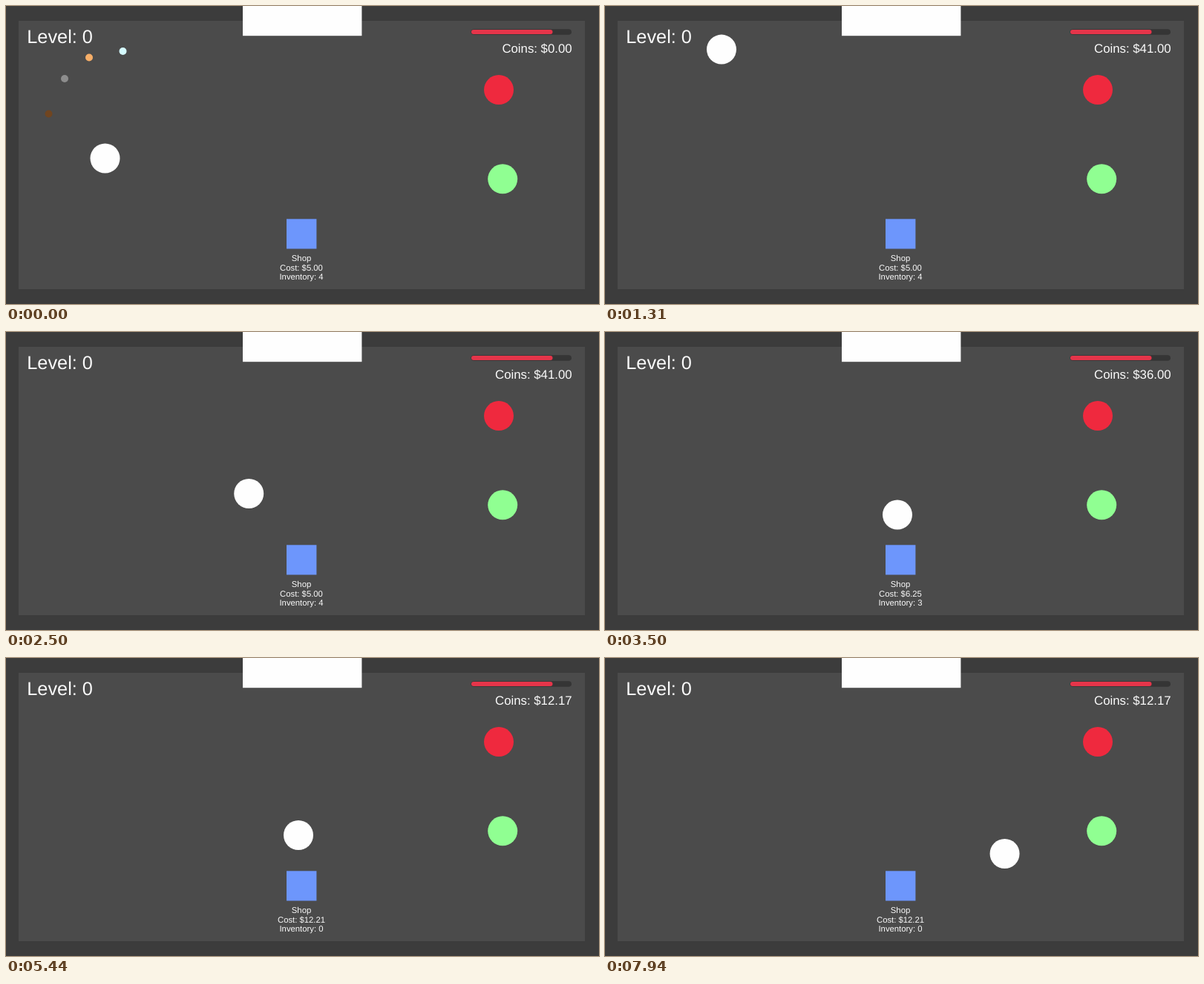
An HTML page with a canvas that plays this animation: 799 px wide and 402 px high, repeating every 8000 ms.

```html
<!DOCTYPE html>
<html lang="en">
<head>
<meta charset="utf-8">
<title>Coin shop</title>
<style>
  html, body { margin: 0; width: 100%; height: 100%; overflow: hidden; background: #3c3c3c; }
  canvas { display: block; }
</style>
</head>
<body>
<canvas id="stage" width="799" height="402"></canvas>
<script>
const ctx = document.getElementById('stage').getContext('2d');
ctx.textRendering = 'geometricPrecision';

const LOOP = 8000;
const STEP = 62.5;      // 16 pictures per second
const SPEED = 0.205;    // player speed, px per ms
const REACH = 25;       // player radius + coin radius
const WHITE = '#fefefe';
const DOOR = { x: 394, y: 267 };
const LEAVE = 6902;

// Corners of the walks; the player moves at constant speed between them.
const collectRoute = [
  [133.5, 205.5], [77.6, 205.5], [55, 183], [55, 158], [93, 120], [93, 98],
  [132, 59], [157, 59], [157, 56.3], [157, 63], [312, 218], [DOOR.x, 218], [DOOR.x, DOOR.y]
];
const leaveRoute = [
  [DOOR.x, DOOR.y], [DOOR.x, 223.5], [403, 214.5], [476, 214.5], [525.5, 264], [560, 264]
];

const coins = [
  { x: 57.5, y: 145.5, color: '#704520', value: 1 },
  { x: 79, y: 98, color: '#8d8d8d', value: 5 },
  { x: 112, y: 69.5, color: '#f6ae68', value: 10 },
  { x: 157.5, y: 61, color: '#d5fbff', value: 25 }
];

const dist = (a, b) => Math.hypot(b[0] - a[0], b[1] - a[1]);
const cents = n => Math.round(n * 100) / 100;
const money = n => '$' + n.toFixed(2);

function routeLength(route) {
  return route.slice(1).reduce((sum, p, i) => sum + dist(route[i], p), 0);
}

function walk(route, t) {
  let left = t * SPEED;
  for (let i = 1; i < route.length; i++) {
    const a = route[i - 1], b = route[i], d = dist(a, b);
    if (left <= d) return a.map((v, j) => v + (b[j] - v) * left / d);
    left -= d;
  }
  return route[route.length - 1];
}

// Each hop backs away from the shop and returns; the first three end in a purchase.
const arrive = routeLength(collectRoute) / SPEED;
const hops = [0, 1, 2].map(i => ({ start: arrive + 700 * i, time: 535, height: 45 }));
const purchases = [arrive, ...hops.map(h => h.start + h.time)];
hops.push({ start: 5200, time: 550, height: 28 }, { start: 5950, time: 490, height: 32 });

function hopHeight(hop, t) {
  const up = (t - hop.start) * SPEED;
  const down = (hop.start + hop.time - t) * SPEED;
  return Math.max(0, Math.min(up, down, hop.height));
}

function playerAt(t) {
  if (t < arrive) return walk(collectRoute, t);
  if (t > LEAVE) return walk(leaveRoute, t - LEAVE);
  return [DOOR.x, DOOR.y - Math.max(...hops.map(h => hopHeight(h, t)))];
}

for (const c of coins) {
  c.taken = 0;
  while (dist(playerAt(c.taken), [c.x, c.y]) > REACH && c.taken < arrive) c.taken += 5;
}

function wallet(t) {
  let total = 0, cost = 5, stock = 4;
  for (const c of coins) if (t >= c.taken) total += c.value;
  for (const p of purchases) {
    if (t < p) break;
    total -= cents(cost);
    cost *= 1.25;
    stock--;
  }
  return { total, cost: cents(cost), stock };
}

function rect(x, y, w, h, color) {
  ctx.fillStyle = color;
  ctx.fillRect(x, y, w, h);
}

function bar(x, y, w, h, color) {
  ctx.fillStyle = color;
  ctx.beginPath();
  ctx.roundRect(x, y, w, h, h / 2);
  ctx.fill();
}

function disc(x, y, r, color) {
  ctx.fillStyle = color;
  ctx.beginPath();
  ctx.arc(x, y, r, 0, Math.PI * 2);
  ctx.fill();
}

function label(text, x, y, size, align) {
  ctx.fillStyle = '#fafafa';
  ctx.font = size + 'px "Liberation Sans", Arial, sans-serif';
  ctx.textAlign = align;
  ctx.fillText(text, x, y);
}

function draw(t) {
  const { total, cost, stock } = wallet(t);

  rect(0, 0, 799, 402, '#3c3c3c');
  rect(17, 20, 763, 362, '#4b4b4b');
  rect(319, 0, 160.4, 40.2, WHITE);

  rect(378, 287.3, 40.4, 40.2, '#6d96fc');
  disc(664, 113.1, 20, '#ef293e');
  disc(669.2, 233.3, 20, '#90ff92');
  for (const c of coins) if (t < c.taken) disc(c.x, c.y, 5, c.color);
  disc(...playerAt(t), 20, WHITE);

  bar(626.5, 31.2, 135.5, 7.6, '#353535');
  bar(627, 32, 109.5, 6, '#e5354a');

  label('Level: 0', 28.3, 50.4, 25.3, 'left');
  label('Coins: ' + money(total), 762.6, 63, 16.8, 'right');
  const lines = ['Shop', 'Cost: ' + money(cost), 'Inventory: ' + stock];
  lines.forEach((line, i) => label(line, 398, 343.6 + 12.9 * i, 11.3, 'center'));
}

function tick(now) {
  const step = Math.floor((now % LOOP + 2.5) / STEP);
  draw(Math.min(step * STEP, LOOP - STEP));
  requestAnimationFrame(tick);
}

draw(0);
requestAnimationFrame(tick);
</script>
</body>
</html>
```
